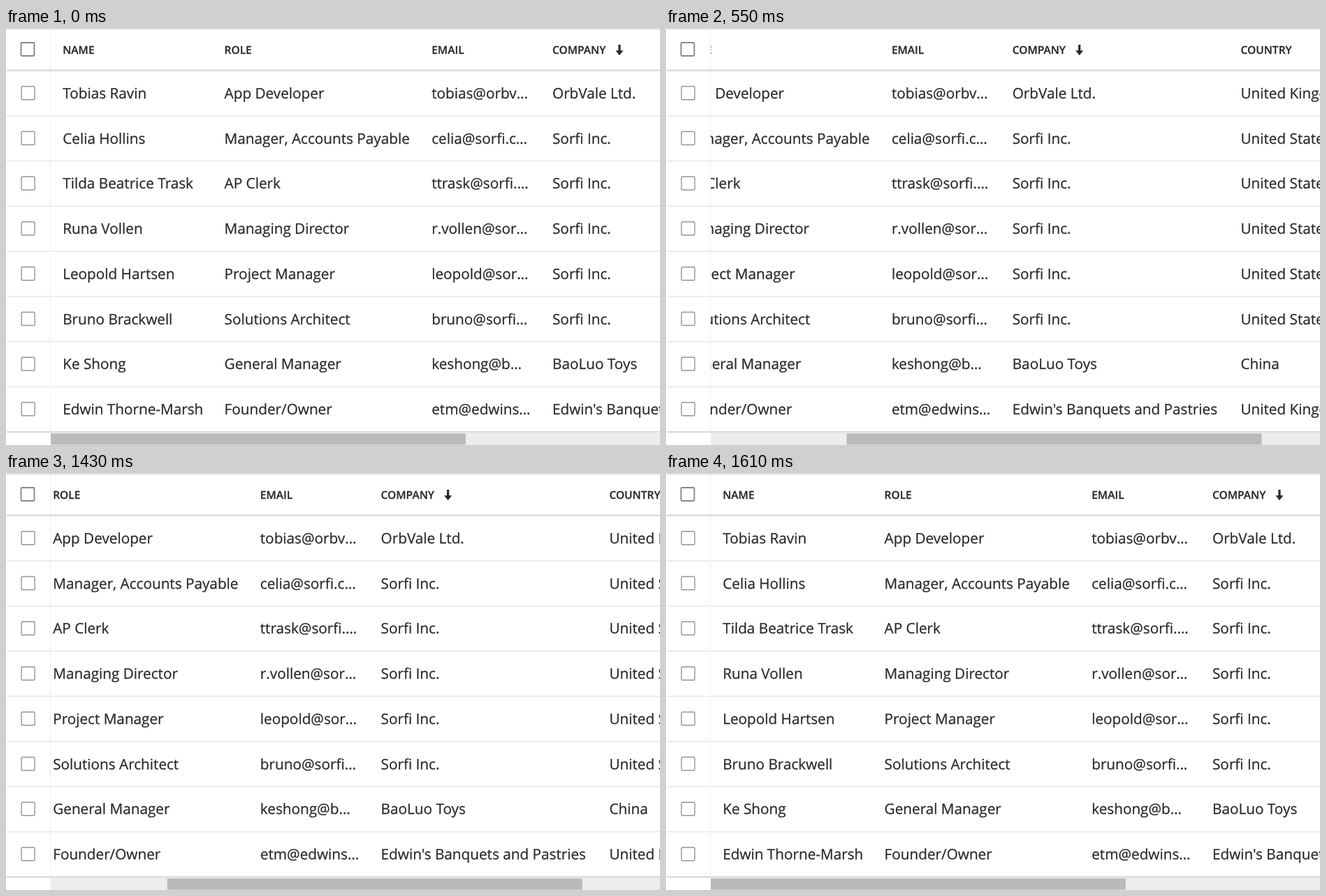
Recreate the animation shown at these times as an HTML page with a canvas. Size 936 by 598 pixels, loop 2.28 s.

```html
<!DOCTYPE html>
<html lang="en">
<head>
<meta charset="utf-8">
<title>Scrolling table</title>
<style>
  html, body { margin: 0; width: 100%; height: 100%; overflow: hidden; background: #fff; }
  canvas { display: block; width: 936px; height: 598px; }
</style>
</head>
<body>
<canvas id="stage" width="936" height="598"></canvas>
<script>
const ctx = document.getElementById('stage').getContext('2d');
const W = 936, H = 598, LOOP = 2280;
const PANE = 64;        // left edge of the scrolling area
const TRAVEL = 409;     // full scroll distance
const ROW = 64.75, FIRST = 126;
const FAMILY = '"Open Sans", "Noto Sans", sans-serif';
const INK = '#292929', RULE = '#e6e6e6', EDGE = '#dcdcdc';

const columns = [
  ['NAME', 81.2], ['ROLE', 312.6], ['EMAIL', 609.2], ['COMPANY', 782], ['COUNTRY', 1108.8]
];
const UK = 'United Kingdom', US = 'United States', SORFI = 'Sorfi Inc.';
const rows = [
  ['Tobias Ravin', 'App Developer', 'tobias@orbv…', 'OrbVale Ltd.', UK],
  ['Celia Hollins', 'Manager, Accounts Payable', 'celia@sorfi.c…', SORFI, US],
  ['Tilda Beatrice Trask', 'AP Clerk', 'ttrask@sorfi.…', SORFI, US],
  ['Runa Vollen', 'Managing Director', 'r.vollen@sor…', SORFI, US],
  ['Leopold Hartsen', 'Project Manager', 'leopold@sor…', SORFI, US],
  ['Bruno Brackwell', 'Solutions Architect', 'bruno@sorfi…', SORFI, US],
  ['Ke Shong', 'General Manager', 'keshong@b…', 'BaoLuo Toys', 'China'],
  ['Edwin Thorne-Marsh', 'Founder/Owner', 'etm@edwins…', "Edwin's Banquets and Pastries", UK]
];

// Ten equal steps of 30 ms, counted from the start time.
const steps = (t, start) =>
  Math.max(0, Math.min(10, Math.floor((t - start) / 30 + 1e-6) + 1)) / 10;

const progress = t => steps(t, 370) - steps(t, 1340);

function rect(x, y, w, h, color) {
  ctx.fillStyle = color;
  ctx.fillRect(x, y, w, h);
}

// A hairline stroke gives the slightly heavier text weight.
function label(text, x, y) {
  ctx.fillStyle = ctx.strokeStyle = INK;
  ctx.lineWidth = 0.25;
  ctx.fillText(text, x, y);
  ctx.strokeText(text, x, y);
}

function checkbox(cx, cy, size, weight, color) {
  ctx.strokeStyle = color;
  ctx.lineWidth = weight;
  ctx.beginPath();
  ctx.roundRect(cx - size / 2, cy - size / 2, size, size, 1.5);
  ctx.stroke();
}

function sortArrow(x) {
  rect(x - 1.6, 24, 3.2, 10, INK);
  ctx.beginPath();
  ctx.moveTo(x - 5.5, 32.2);
  ctx.lineTo(x + 5.5, 32.2);
  ctx.lineTo(x, 39.2);
  ctx.fill();
}

function moreDots(x, y) {
  ctx.fillStyle = '#1f9ae0';
  for (const dx of [-6, 0, 6]) {
    ctx.beginPath();
    ctx.arc(x + dx, y, 2.4, 0, Math.PI * 2);
    ctx.fill();
  }
}

function drawCells(offset) {
  ctx.save();
  ctx.beginPath();
  ctx.rect(PANE, 0, W - PANE, H);
  ctx.clip();
  ctx.translate(-offset, 0);
  ctx.textRendering = 'geometricPrecision';

  ctx.font = `600 15.5px ${FAMILY}`;
  for (const [title, x] of columns) label(title, x, 37.2);
  sortArrow(878);

  ctx.font = `400 20.72px ${FAMILY}`;
  rows.forEach((cells, i) => {
    const y = i * ROW;
    cells.forEach((text, c) => label(text, columns[c][1], 100.8 + y));
    moreDots(1313.5, 92.3 + y);
    if (i < rows.length - 1) rect(65.5, FIRST + y - 0.7, 1400, 1.4, RULE);
  });
  ctx.restore();
}

function drawFixed() {
  checkbox(31, 30.5, 19, 1.9, '#888');
  rows.forEach((_, i) => {
    checkbox(31.6, 93.3 + i * ROW, 19, 1.4, '#959595');
    if (i < rows.length - 1) rect(1, FIRST + i * ROW - 0.7, PANE - 1.5, 1.4, RULE);
  });
  ctx.strokeStyle = '#dedede';
  ctx.lineWidth = 1;
  ctx.setLineDash([1.3, 1.3]);
  ctx.beginPath();
  ctx.moveTo(63.5, 2);
  ctx.lineTo(63.5, 579);
  ctx.stroke();
  ctx.setLineDash([]);
  for (const y of [-0.4, 59.5, 578]) rect(1, y, W - 1, 2.6, EDGE);
}

function drawScrollbar(p) {
  rect(PANE, 581, W - PANE, 17, '#ededed');
  ctx.fillStyle = '#bababa';
  ctx.beginPath();
  ctx.roundRect(PANE + 278 * p, 581.5, 594, 16, 1);
  ctx.fill();
}

function draw(now) {
  const p = progress(now % LOOP);
  rect(0, 0, W, H, '#fff');
  drawCells(TRAVEL * p);
  drawFixed();
  drawScrollbar(p);
}

function tick() {
  draw(performance.now());
  requestAnimationFrame(tick);
}
tick();
</script>
</body>
</html>
```
